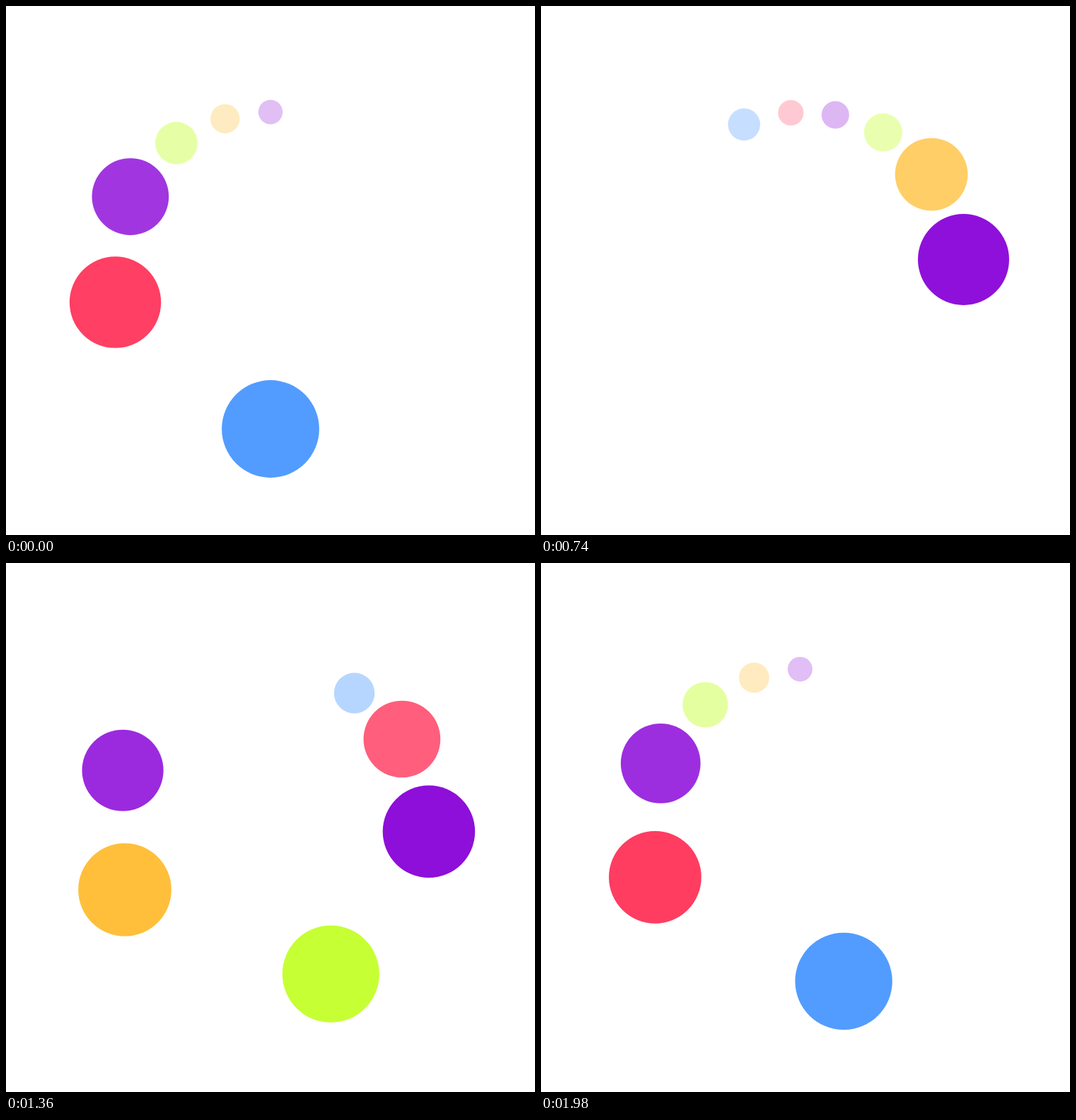
An HTML page with a canvas for the animation above (2000 ms loop, 748 by 748 pixels).

```html
<!DOCTYPE html>
<html lang="en">
<head>
<meta charset="utf-8">
<title>Orbiting dots</title>
<style>
  html, body { margin: 0; width: 100%; height: 100%; overflow: hidden; background: #fff; }
  canvas { display: block; }
</style>
</head>
<body>
<canvas id="stage" width="748" height="748"></canvas>
<script>
const ctx = document.getElementById('stage').getContext('2d');
const LOOP = 2000, CENTER = 374, ORBIT = 224;
const BIG = 68.9, SMALL = 17.2, FAINT = 0.25;
const COLORS = ['#529cff', '#ff3359', '#8800d8', '#c6ff33', '#ffbd33', '#8800d8'];

// Cubic Bezier easing, solved by bisection
function bezier(x1, y1, x2, y2) {
  const at = (a, b, s) => 3 * (1 - s) * (1 - s) * s * a + 3 * (1 - s) * s * s * b + s * s * s;
  return x => {
    let lo = 0, hi = 1;
    for (let i = 0; i < 24; i++) {
      const mid = (lo + hi) / 2;
      if (at(x1, x2, mid) < x) lo = mid; else hi = mid;
    }
    return at(y1, y2, (lo + hi) / 2);
  };
}

const turn = bezier(0.152, 0.5, 0.388, 0.734);
const shrink = bezier(0.72, 0.2, 0.27, 0.84);
const grow = bezier(0.72, 0.18, 0.25, 0.9);

// Each dot rises from the bottom to the top, then falls on the mirrored path
function drawDot(color, phase) {
  const rising = phase < 0.5;
  const angle = Math.PI * turn(rising ? phase * 2 : 2 - phase * 2);
  const side = rising ? -1 : 1;
  const size = rising ? 1 - shrink(phase * 2) : grow(phase * 2 - 1);
  ctx.globalAlpha = FAINT + (1 - FAINT) * size;
  ctx.fillStyle = color;
  ctx.beginPath();
  ctx.arc(CENTER + side * ORBIT * Math.sin(angle), CENTER + ORBIT * Math.cos(angle),
    SMALL + (BIG - SMALL) * size, 0, 2 * Math.PI);
  ctx.fill();
}

function draw(now) {
  // 50 pictures per second, each posed on a 120 Hz clock
  const shown = Math.floor(now % LOOP / 20) * 20;
  const time = Math.floor(shown * 0.12 + 1e-6) / 0.12;
  ctx.clearRect(0, 0, 748, 748);
  COLORS.forEach((color, i) => drawDot(color, (time + i * 200) % LOOP / LOOP));
}

const start = performance.now();
function tick() {
  draw(performance.now() - start);
  requestAnimationFrame(tick);
}
tick();
</script>
</body>
</html>
```
